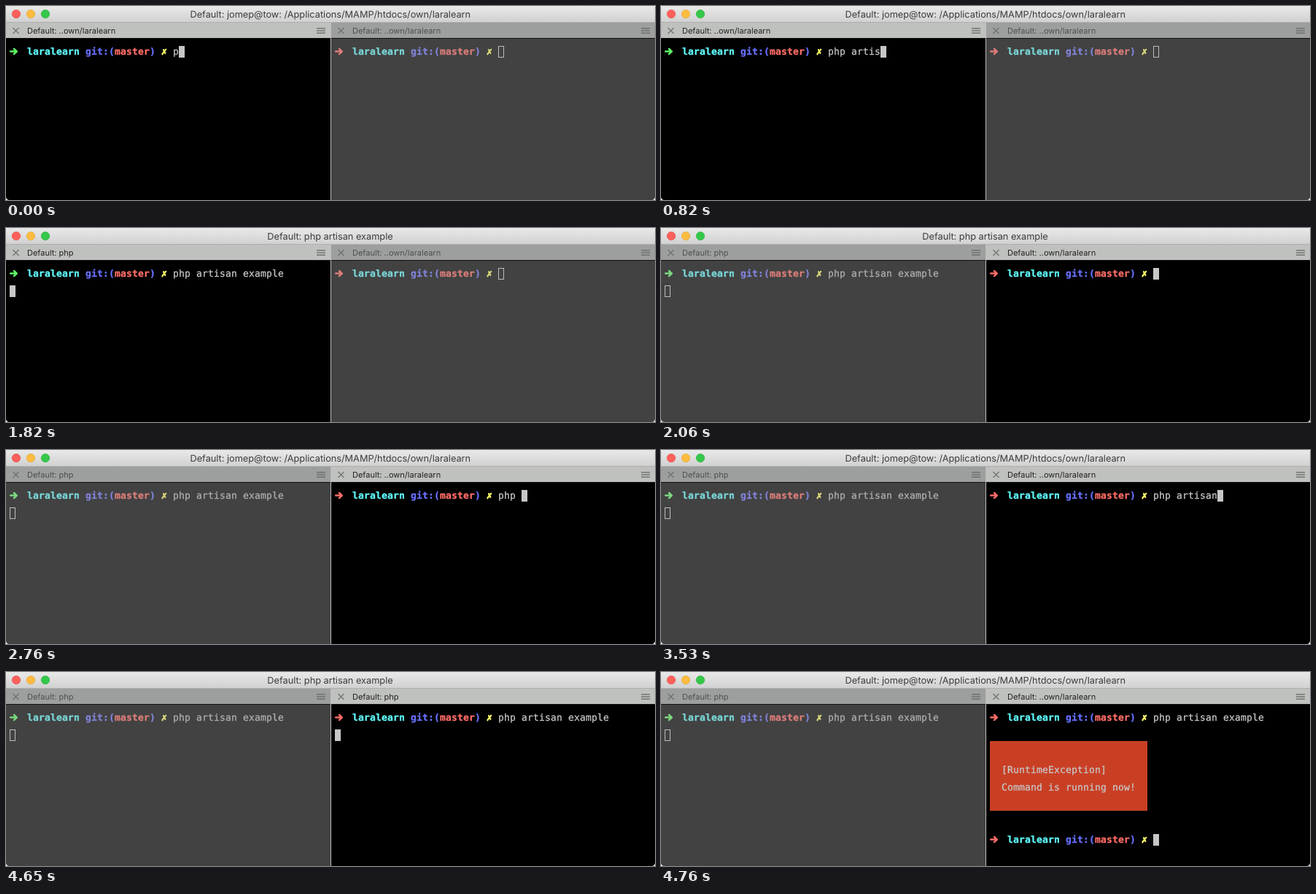
An HTML page for the animation above (7.18 s loop, 890x267 px).

```html
<!DOCTYPE html>
<html lang="en">
<head>
<meta charset="utf-8">
<title>Terminal</title>
<style>
  html, body { margin: 0; width: 100%; height: 100%; overflow: hidden; background: #fff; }
  svg { display: block; width: 890px; height: 267px; }
  text { white-space: pre; text-rendering: geometricPrecision; }
  .ui { font-family: Inter, "Open Sans", sans-serif; }
  .title { font-size: 12.74px; fill: #3c3c3c; }
  .tab { font-size: 11px; fill: var(--tab); }
  .mono {
    --ink: var(--text);
    font: 13px "DejaVu Sans Mono", "DejaVu Sans", monospace; letter-spacing: .174px;
    fill: var(--ink); stroke: var(--ink); stroke-width: .3px;
  }
  .bold { font-weight: bold; }
  .cyan { --ink: var(--cyan); }
  .blue { --ink: var(--blue); }
  .red { fill: var(--red); stroke: var(--red); }
  .cross { --ink: var(--yellow); stroke-width: .9px; text-anchor: middle; }
  .arrow { fill: none; stroke-width: 2.5; stroke-linecap: round; stroke-linejoin: round; }
  .icon { fill: none; stroke: var(--icon); }
  .pane {
    --bg: #424242; --bar: #9d9f9e; --tab: #4e4f4f; --icon: #6f7170; --text: #afafaf;
    --cyan: #7bd8d9; --blue: #8083d9; --red: #da7d7a; --yellow: #d9d77c; --green: #7ad87e;
  }
  .pane.active {
    --bg: #000; --bar: #bfc1be; --tab: #222; --icon: #737573; --text: #c7c7c7;
    --cyan: #60fdff; --blue: #6871ff; --red: #ff6d67; --yellow: #fefb67; --green: #5ff967;
  }
  .cursor { fill: none; stroke: #bdbdbd; }
  .active .cursor { fill: #c7c7c7; stroke: #c7c7c7; }
</style>
</head>
<body>
<svg id="stage" viewBox="0 0 890 267"></svg>
<script>
const LOOP = 7180;
const COMMAND = "php artisan example";
const HOME_TAB = "Default: ..own/laralearn";
const BUSY_TAB = "Default: php";
const HOME_TITLE = "Default: jomep@tow: /Applications/MAMP/htdocs/own/laralearn";
const BUSY_TITLE = "Default: php artisan example";

// [time, typed characters]
const LEFT_KEYS = [[0, 1], [60, 2], [120, 4], [290, 5], [470, 6], [590, 7], [650, 8],
  [820, 9], [880, 11], [940, 12], [1060, 13], [1230, 14], [1290, 16], [1470, 17],
  [1650, 18], [1710, 19]];
const RIGHT_KEYS = [[0, 0], [2590, 1], [2650, 2], [2700, 3], [2760, 4], [2940, 5], [3120, 6],
  [3240, 7], [3290, 8], [3410, 10], [3530, 11], [3650, 12], [3820, 13], [4000, 14],
  [4120, 15], [4180, 16], [4290, 17], [4410, 18], [4530, 19]];
const LEFT_ENTER = 1820, FOCUS = 2060, TITLE_BACK = 2120;
const RIGHT_ENTER = 4590, OUTPUT = 4700, DONE = 4760;

const PROMPT_COLS = 28;
const col = n => 5 + 8 * n;
const rowTop = n => 47 + 24 * n;
const baseline = n => rowTop(n) + 20;

const mono = (c, row, cls, str) =>
  `<text class="mono ${cls}" x="${col(c)}" y="${baseline(row)}">${str}</text>`;

function prompt(row, arrow) {
  const y = rowTop(row) + 15.6;
  return `<path class="arrow" stroke="var(--${arrow})" d="M6.2 ${y}H14M11 ${y - 3.6}L14.8 ${y}L11 ${y + 3.6}"/>`
    + mono(3, row, "bold cyan", "laralearn")
    + mono(13, row, "bold blue", 'git:(<tspan class="red">master</tspan>)')
    + mono(26.5, row, "bold cross", "✗");
}

function pane(id, x, width, arrow, extra = "") {
  const menu = width - 19;
  return `<g id="${id}" class="pane" transform="translate(${x})">
    <rect y="44" width="${width}" height="223" fill="var(--bg)"/>
    <rect y="23" width="${width}" height="21" fill="var(--bar)"/>
    <rect y="44" width="${width}" height="1" fill="#111"/>
    <path class="icon" stroke-width="1.4" d="M9.5 30l8 8M17.5 30l-8 8"/>
    <path class="icon" stroke-width="1.5" d="M${menu} 30.8h12m-12 3.2h12m-12 3.2h12"/>
    <text class="ui tab" x="29" y="38"></text>
    ${prompt(0, arrow)}
    ${mono(PROMPT_COLS, 0, "typed", "")}
    ${extra}
    <rect class="cursor" width="7" height="15"/>
  </g>`;
}

const output = `<g id="output">
    <rect x="5" y="${rowTop(2)}" width="${27 * 8}" height="96" fill="#c93f24"/>
    ${mono(2, 3, "", "[RuntimeException]")}${mono(2, 4, "", "Command is running now!")}
  </g><g id="next">${prompt(7, "red")}</g>`;

const lights = [["#fc605b", "#e5504c"], ["#fdbc40", "#e3a73a"], ["#34c84a", "#2cb03c"]]
  .map(([fill, edge], i) => `<circle cx="${14 + 20 * i}" cy="11" r="5.7" fill="${fill}" stroke="${edge}" stroke-width=".7"/>`)
  .join("");

const stage = document.getElementById("stage");
stage.innerHTML = `
  <defs>
    <linearGradient id="chrome" x2="0" y2="1"><stop stop-color="#e9e9e9"/><stop offset="1" stop-color="#d1d1d1"/></linearGradient>
    <clipPath id="frame"><rect width="890" height="267" rx="4.5"/></clipPath>
  </defs>
  <g clip-path="url(#frame)">
    <rect width="890" height="267" fill="#bdbdbd"/>
    <rect width="890" height="22" fill="url(#chrome)"/>
    <rect y="22" width="890" height="1" fill="#aeaeae"/>
    ${lights}
    <text id="title" class="ui title" y="16"></text>
    ${pane("left", 0, 445, "green")}
    ${pane("right", 446, 444, "red", output)}
  </g>`;

const $ = selector => stage.querySelector(selector);
const title = $("#title");
const show = (selector, on) => $(selector).setAttribute("visibility", on ? "visible" : "hidden");
const typedAt = (keys, t) => keys.findLast(([time]) => time <= t)[1];

function setTitle(busy) {
  title.textContent = busy ? BUSY_TITLE : HOME_TITLE;
  title.setAttribute("x", busy ? 444.5 : 252.5);
  title.setAttribute("text-anchor", busy ? "middle" : "start");
}

function setPane(id, active, busy, count, [c, row]) {
  const root = $("#" + id);
  root.classList.toggle("active", active);
  root.querySelector(".tab").textContent = busy ? BUSY_TAB : HOME_TAB;
  root.querySelector(".typed").textContent = COMMAND.slice(0, count);
  const cursor = root.querySelector(".cursor");
  cursor.setAttribute("x", col(c) + 0.5);
  cursor.setAttribute("y", rowTop(row) + 8.5);
}

function render(t) {
  const left = typedAt(LEFT_KEYS, t), right = typedAt(RIGHT_KEYS, t);
  const leftBusy = t >= LEFT_ENTER;
  const rightBusy = t >= RIGHT_ENTER && t < DONE;

  let rightCursor = [PROMPT_COLS + right, 0];
  if (t >= DONE) rightCursor = [PROMPT_COLS, 7];
  else if (t >= OUTPUT) rightCursor = [0, 7];
  else if (t >= RIGHT_ENTER) rightCursor = [0, 1];

  setTitle(rightBusy || (leftBusy && t < TITLE_BACK));
  setPane("left", t < FOCUS, leftBusy, left, leftBusy ? [0, 1] : [PROMPT_COLS + left, 0]);
  setPane("right", t >= FOCUS, rightBusy, right, rightCursor);
  show("#output", t >= OUTPUT);
  show("#next", t >= DONE);
}

const start = performance.now();
function tick() {
  render((performance.now() - start) % LOOP);
  requestAnimationFrame(tick);
}
tick();
</script>
</body>
</html>
```
